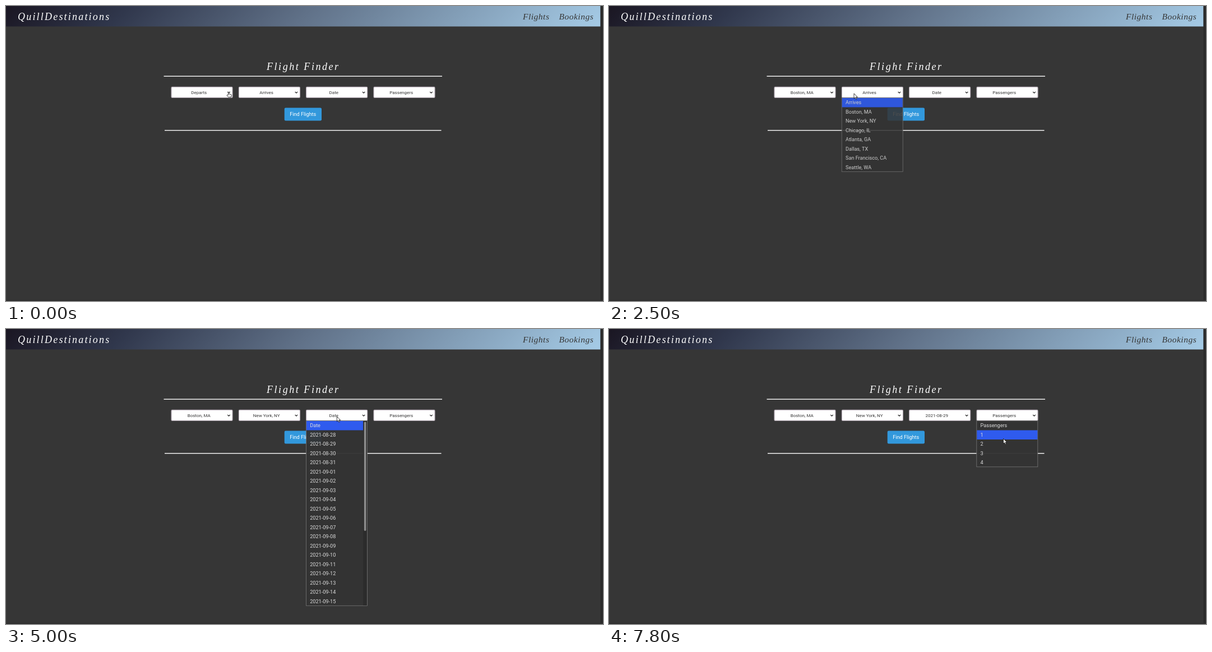
An HTML page for the animation above (8 s loop, 1065 px wide and 526 px high).

```html
<!DOCTYPE html>
<html lang="en">
<head>
<meta charset="utf-8">
<title>Flight Finder</title>
<style>
  html, body { margin: 0; width: 100%; height: 100%; overflow: hidden; background: #363636; }
  svg { display: block; width: 100%; height: 100%; font-family: Roboto, sans-serif; }
  .script { font-family: "Liberation Serif", serif; font-style: italic; }
  .row { font-size: 9.15px; fill: #dcdcdc; }
  .value { font-size: 8px; fill: #363636; text-anchor: middle; }
</style>
</head>
<body>
<svg id="stage" viewBox="0 0 1065 526" preserveAspectRatio="none">
  <defs>
    <linearGradient id="sky" gradientUnits="userSpaceOnUse" x1="256" y1="-256" x2="804" y2="292">
      <stop offset="0" stop-color="#1a1622"/>
      <stop offset=".2" stop-color="#30374c"/>
      <stop offset=".5" stop-color="#607188"/>
      <stop offset="1" stop-color="#a5cbe6"/>
    </linearGradient>
  </defs>
  <rect width="1065" height="526" fill="#363636"/>
  <rect width="1060.5" height="36.5" fill="url(#sky)"/>
  <rect x="1060.5" width="4.5" height="526" fill="#2b2b2b"/>
  <rect y="524" width="1065" height="2" fill="#2e2e2e"/>
  <g class="script">
    <text x="21" y="24.5" font-size="18" letter-spacing="2.2" fill="#fff">QuillDestinations</text>
    <g font-size="15.5" letter-spacing=".5" fill="#363636">
      <text x="922" y="24">Flights</text>
      <text x="986.5" y="24">Bookings</text>
    </g>
    <text x="465" y="113.5" font-size="18" letter-spacing="2.55" fill="#fff">Flight Finder</text>
  </g>
  <path d="M281.5 125.2H778M283 221.8H776.5" stroke="#eee" stroke-width="1.4"/>
  <rect id="button" x="496.7" y="181.5" width="66.3" height="23" rx="2.3"/>
  <text x="529.8" y="196.4" font-size="9.15" text-anchor="middle" fill="#fff">Find Flights</text>
  <g id="fields"></g>
  <g id="menus"></g>
  <path id="arrow" d="M0 0V9L2.1 7.1L3.5 10.2L5 9.5L3.6 6.5H6.4Z" fill="#fff" stroke="#111" stroke-width=".8" stroke-linejoin="round"/>
  <path id="hand" d="M-1.6 6V.9Q-.8 -.3 0 .9V4L3.2 4.7Q4.3 5 4.2 6.2L3.7 9.4H-1.4L-4 6.6Q-3.8 5.2 -2.6 5.7Z" fill="#fff" stroke="#111" stroke-width=".8" stroke-linejoin="round"/>
</svg>
<script>
const NS = "http://www.w3.org/2000/svg";
const LOOP = 8000, ROW = 16.5, TOP = 164, WIDTH = 109;
const $ = id => document.getElementById(id);

function add(parent, tag, attrs, text) {
  const el = document.createElementNS(NS, tag);
  for (const k in attrs) el.setAttribute(k, attrs[k]);
  if (text) el.textContent = text;
  return parent.appendChild(el);
}

const dates = Array.from({ length: 19 }, (_, i) =>
  new Date(Date.UTC(2021, 7, 28 + i)).toISOString().slice(0, 10));
const cities = ["Boston, MA", "New York, NY", "Chicago, IL", "Atlanta, GA",
  "Dallas, TX", "San Francisco, CA", "Seattle, WA"];

// open/close: menu times; hover: [time, row]; fade: opacity per 100 ms step
const fields = [
  { x: 295, items: ["Departs", ...cities], open: 700, close: 1600, pick: 1, hover: [[1300, 1]], fade: [.5, .85] },
  { x: 415.4, items: ["Arrives", ...cities], open: 2400, close: 3500, pick: 2, hover: [[3200, 2]], fade: [.5, .9] },
  { x: 535.6, items: ["Date", ...dates], open: 5000, close: 6800, pick: 2, hover: [[5600, 1], [5900, 2]], fade: [], scroll: true },
  { x: 656, items: ["Passengers", "1", "2", "3", "4"], open: 7500, close: LOOP, pick: 0, hover: [[7800, 1]], fade: [] }
];

// time, pointer, x, y
const moves = [
  [0, "hand", 398, 153], [700, "arrow", 396, 154], [1100, "arrow", 380, 168],
  [1200, "arrow", 366, 180], [1300, "arrow", 362, 186], [1400, "arrow", 360, 189],
  [1600, "arrow", 362, 187], [1700, "arrow", 378, 179], [1800, "arrow", 399, 169],
  [1900, "hand", 420, 160], [2000, "hand", 428, 160], [2100, "arrow", 434, 165],
  [2200, "hand", 439, 155.5], [2400, "arrow", 437, 156], [3200, "arrow", 437.5, 201.7],
  [3800, "arrow", 436.7, 201.7], [4100, "hand", 563.5, 178], [4400, "hand", 592, 160.5],
  [4700, "arrow", 590.3, 156], [5300, "arrow", 590, 162.5], [5600, "arrow", 585, 185],
  [5900, "arrow", 578, 200.7], [7100, "hand", 723, 161.5], [7500, "arrow", 714, 154],
  [7800, "arrow", 703.5, 195.5]
];

function build(f) {
  const mid = f.x + WIDTH / 2;
  add($("fields"), "rect", { x: f.x, y: 144.4, width: WIDTH, height: 19, rx: 1.6, fill: "#fff", stroke: "#b5abb5", "stroke-width": 1.2 });
  f.value = add($("fields"), "text", { class: "value", x: mid - 5.3, y: 156.8 });
  add($("fields"), "path", { d: `M${f.x + 100.3} 153l2.2 2.2l2.2 -2.2`, fill: "none", stroke: "#222", "stroke-width": 1.1 });

  const h = f.items.length * ROW;
  f.menu = add($("menus"), "g", {});
  add(f.menu, "rect", { x: f.x - .2, y: TOP - .3, width: WIDTH, height: h - .4, fill: "#343434", "fill-opacity": .96, stroke: "#777", "stroke-width": .8 });
  f.bar = add(f.menu, "rect", { x: f.x + .3, width: f.scroll ? 101.3 : WIDTH - .9, height: ROW, fill: "#2f5bee" });
  if (f.scroll) {
    add(f.menu, "rect", { x: 637.2, y: TOP, width: 6.8, height: h - 1, fill: "#2c2c2c" });
    add(f.menu, "rect", { x: 638.8, y: 165.5, width: 3.6, height: 194.5, rx: 1.8, fill: "#8c8c8c" });
  }
  f.items.forEach((s, i) =>
    add(f.menu, "text", { class: "row", x: f.x + 6.6, y: TOP + 11.4 + i * ROW }, s));
}

const latest = (list, t) => list.filter(k => k[0] <= t).pop();

function draw(t) {
  for (const f of fields) {
    const open = t >= f.open && t < f.close;
    f.value.textContent = f.items[t >= f.close ? f.pick : 0];
    f.menu.style.display = open ? "" : "none";
    if (!open) continue;
    f.menu.setAttribute("opacity", f.fade[Math.floor((t - f.open) / 100)] ?? 1);
    const hit = latest(f.hover, t);
    f.bar.setAttribute("y", TOP + (hit ? hit[1] : 0) * ROW);
  }
  const [, kind, x, y] = latest(moves, t);
  for (const id of ["arrow", "hand"]) {
    $(id).style.display = id === kind ? "" : "none";
    $(id).setAttribute("transform", `translate(${x} ${y})`);
  }
  $("button").setAttribute("fill", t >= 4100 && t < 4400 ? "#2793da" : "#3298dc");
}

fields.forEach(build);
draw(0);
let start;
requestAnimationFrame(function tick(now) {
  start ??= now;
  draw((now - start) % LOOP);
  requestAnimationFrame(tick);
});
</script>
</body>
</html>
```
